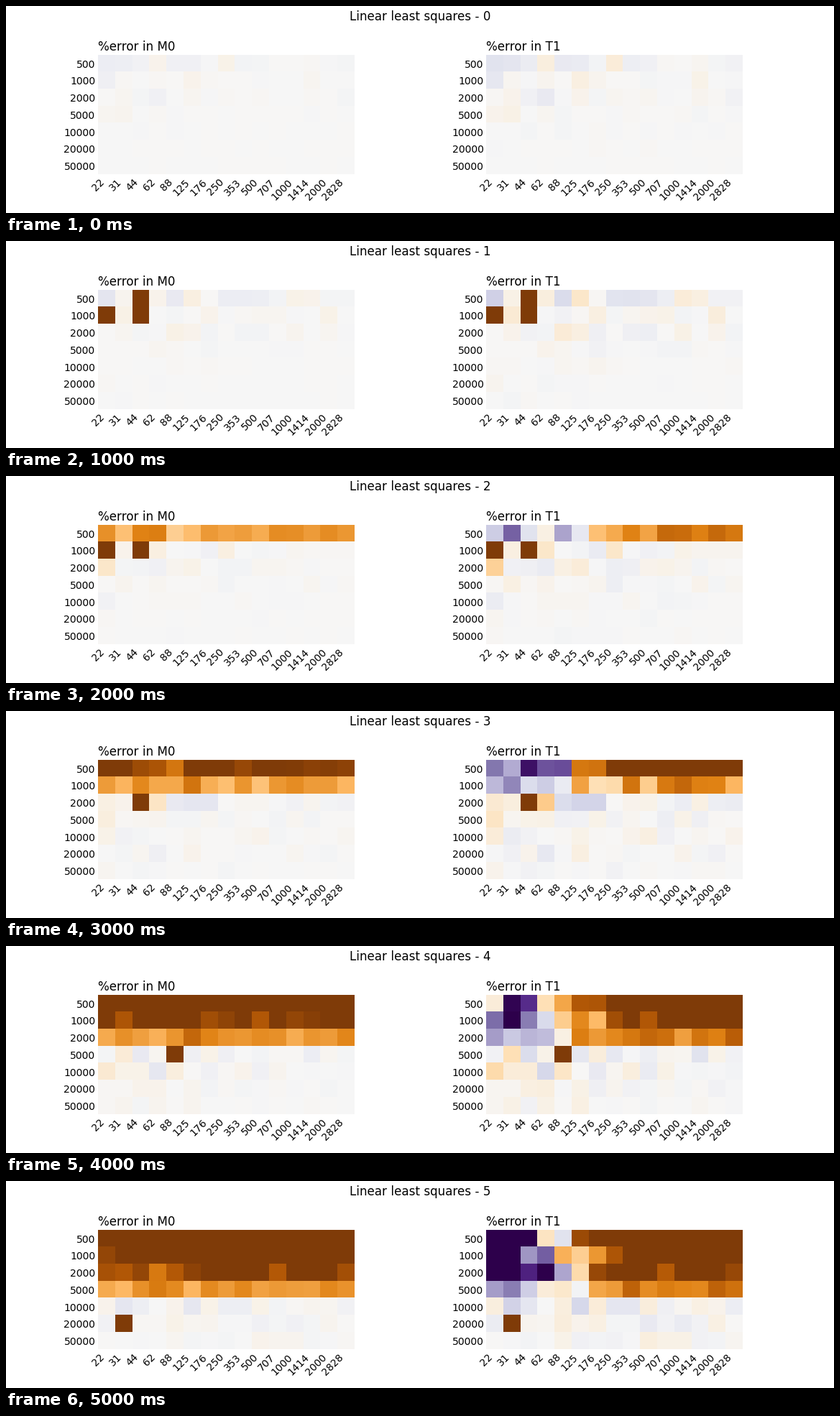
A matplotlib script for the animation above (6000 ms loop, 1152 by 288 pixels).

```python
import numpy as np
import matplotlib.pyplot as plt
from matplotlib.animation import FuncAnimation

WIDTH, HEIGHT, DPI = 1152, 288, 72
SNR = np.array([500, 1000, 2000, 5000, 10000, 20000, 50000])
T1 = np.round(1000 * 2 ** np.arange(-5.5, 2, .5) - .3).astype(int)
ORDERS = 6
CELL = 23.75
TOP = 68.2
LIMIT = 10

# Failed fits as (order, row, column).
OUTLIERS = [(1, 0, 2), (1, 1, 0), (1, 1, 2), (2, 1, 0), (2, 1, 2),
            (3, 2, 2), (4, 3, 4), (5, 5, 1)]


def errors(order):
    """Return the M0 and T1 error maps for one polynomial order."""
    rng = np.random.default_rng(40 + order)
    rows, cols = np.indices((len(SNR), len(T1)))
    spread = 1.2 * 1.6**order * (500 / SNR[rows])**.65 * np.exp(-cols / 12)
    noise = spread * rng.normal(size=rows.shape)

    # Bias grows with order and noise; T1 is underestimated at short times.
    bias = 5 * np.maximum(order - rows - 1, 0)
    t1 = bias * np.clip((cols - 4) / 3, -.7, 1.2) + noise
    m0 = bias + .5 * noise
    for failed_order, row, col in OUTLIERS:
        if failed_order == order:
            t1[row, col] = m0[row, col] = LIMIT
    return m0, t1


def add_heatmap(left, title):
    width, height = CELL * len(T1), CELL * len(SNR)
    ax = fig.add_axes([left / WIDTH, 1 - (TOP + height) / HEIGHT,
                       width / WIDTH, height / HEIGHT])
    image = ax.imshow(np.zeros((len(SNR), len(T1))), cmap="PuOr_r",
                      vmin=-LIMIT, vmax=LIMIT, aspect="auto",
                      interpolation="nearest")
    ax.set_title(title, loc="left")
    ax.set_xticks(range(len(T1)), T1, rotation=45, ha="right")
    ax.set_yticks(range(len(SNR)), SNR)
    ax.tick_params(length=0, pad=3.5)
    ax.spines[:].set_visible(False)
    return image


def update(order):
    heading.set_text(f"Linear least squares - {order}")
    for image, values in zip(images, errors(order)):
        image.set_data(values)
    return [heading, *images]


plt.rcParams.update({"font.family": "DejaVu Sans", "font.size": 14})
fig = plt.figure(figsize=(WIDTH / DPI, HEIGHT / DPI), dpi=DPI, facecolor="white")
heading = fig.suptitle("")
images = [add_heatmap(127.85, "%error in M0"), add_heatmap(667.9, "%error in T1")]

anim = FuncAnimation(fig, update, frames=ORDERS, interval=1000,
                     repeat=True, repeat_delay=0)
plt.show()
```
